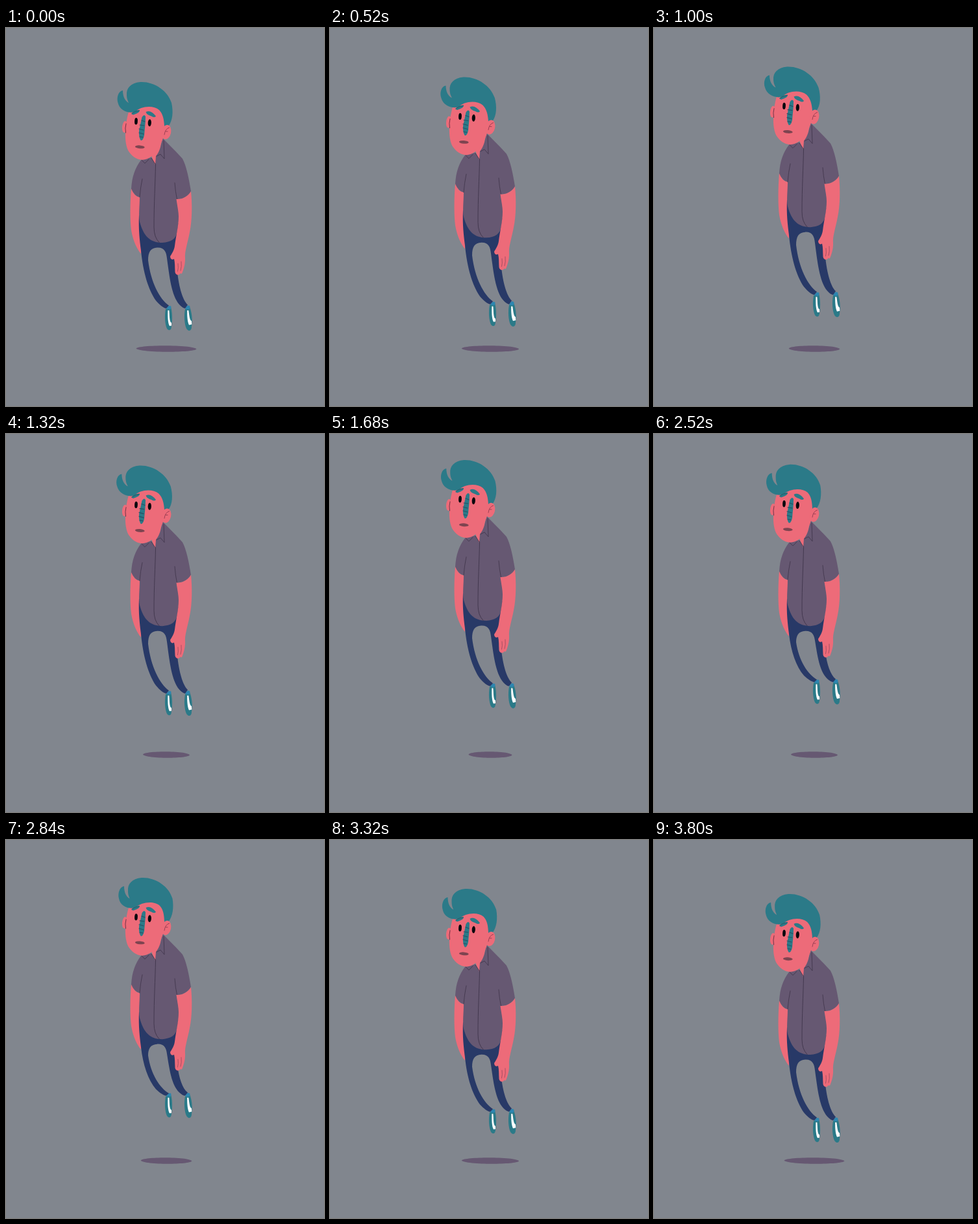
Write an HTML page with a canvas that moves like this. It is 490 px wide and 581 px high and loops after 3.84 s.

```html
<!DOCTYPE html>
<html lang="en">
<head>
<meta charset="utf-8">
<title>Floating man</title>
<style>
html, body { margin: 0; width: 100%; height: 100%; overflow: hidden; background: #81868e; }
canvas { display: block; }
</style>
</head>
<body>
<canvas id="stage" width="490" height="581"></canvas>
<script>
const ctx = document.getElementById('stage').getContext('2d');
const LOOP = 3840, STEP = 40;
const BG = '#81868e', SKIN = '#ed6b79', SHIRT = '#665872', PANTS = '#283967',
      TEAL = '#2b7a88', SOCK = '#2c86b0', LINE = '#43384f', MOUTH = '#7e4450';

// Height gained at time t: eases up until `peak`, then back down.
function lift(t, peak, height) {
  const u = t < peak ? t / peak : (LOOP - t) / (LOOP - peak);
  return height * (1 - Math.cos(Math.PI * u)) / 2;
}

const ramp = (v, a, b) => Math.min(1, Math.max(0, (v - a) / (b - a)));

// Moves every "x y" pair of a path description.
function bend(d, move) {
  return new Path2D(d.replace(/([\d.]+) ([\d.]+)/g, (_, x, y) => move(+x, +y).join(' ')));
}

function fill(d, color, move) {
  ctx.fillStyle = color;
  ctx.fill(bend(d, move));
}

function line(d, color, width, move) {
  ctx.strokeStyle = color;
  ctx.lineWidth = width;
  ctx.stroke(bend(d, move));
}

function oval(x, y, rx, ry, tilt, color) {
  ctx.fillStyle = color;
  ctx.beginPath();
  ctx.ellipse(x, y, rx, ry, tilt, 0, Math.PI * 2);
  ctx.fill();
}

function drawShadow(rise) {
  const r = 46.5 - 13.5 * rise / 45, x = 247;
  ctx.fillStyle = SHIRT;
  ctx.beginPath();
  ctx.moveTo(x - r, 492.5);
  ctx.bezierCurveTo(x - r * .9, 486.8, x + r * .9, 486.8, x + r, 493.5);
  ctx.bezierCurveTo(x + r * .9, 499.3, x - r * .9, 499.3, x - r, 492.5);
  ctx.fill();
}

function drawLegs(move) {
  fill('M205 288 C204 310 206 326 208 342 C211 374 219 402 231 419 C237 426 243 430.5 247 431' +
    ' L251 426.5 C237 417 223 391 219 357 C219 344 223 338 233 337.5 C244 337 247 344 248 354' +
    ' C252 383 255 411 267 425 Q272 430.5 276 431 L280 425.5 C272 418 266.5 398 264 375 L266 300 Z', PANTS, move);
}

function drawShoes(move) {
  fill('M246 432 C244 443 245 455 248 462 C251 466 255 465 255 458 C257 448 256 436 254 429 Z', TEAL, move);
  fill('M276 432 C274 443 275 455 278 462 C281 467 286 466 286 459 C288 448 286 436 283 429 Z', TEAL, move);
  fill('M247 431 Q251 425 254.5 428 L254 432 Q250 434 247 431 Z', SOCK, move);
  fill('M276 431 Q280 424 283.5 428 L283 432 Q279 434 276 431 Z', SOCK, move);
  fill('M249.4 434 C249 443 249.3 453 252 458 L255 457.5 L255 453 C251.3 452 252.2 440 251.3 434 Z', '#fff', move);
  fill('M279.2 434 C279 443 279.7 452 282 456.5 L286.3 455.5 L286 450.5 C282.5 449 282.5 440 281.2 434 Z', '#fff', move);
}

function drawShirt(move) {
  fill('M224 196 L239 176 L236 203 L230 212 Z', SKIN, move);
  fill('M208 203 C199 215 194 228 193 247 C196 254 201 259.5 206 260 C206 274 204 288 206 298' +
    ' C212 320 222 330 241 330 C254 329 262 325 264 312 L267 290 L263 263 C272 264 281 258 285 251' +
    ' C282 232 278 212 272 201 C264 192 254 182 241 169 C239 182 236 191 231 197 L230 210 L224 199 Z', SHIRT, move);
  line('M230.5 209 C230 240 228 268 228 306 Q228 322 236 329.5', LINE, 1, move);
  line('M210 232 Q207 246 206 260 M260 238 Q261 252 263.5 263', LINE, .9, move);
  line('M209 203 L214 208 L220 202 M224 200 L230 209 M243 173 L244 201 L238 194 L232 197', LINE, .9, move);
}

function drawLeftArm(move) {
  fill('M193 246 C191 270 191 296 193 311 C196 328 202 340 208 347 L209 300 L206 260 Q197 259 193 246 Z', SKIN, move);
}

function drawRightArm(move) {
  fill('M262.5 263 C272 264 281 258 285 251 C287 270 287 296 283 314 C280 330 275 344 276 353' +
    ' C276.5 361 274 370 272 375 Q271 379 268.5 377 C267 381 261 380 260.5 375 C260 367 260.5 361 259 355' +
    ' C256 357 253 355 253 351 C256 346 259 342 260 335 C262 319 266 304 266 290 C266 282 264 274 262.5 263 Z', SKIN, move);
  line('M265 362 Q266 369 264.5 374 M270 359 Q271 367 269 373', '#9e4c61', .9, move);
}

function drawHead(move, sway) {
  const swept = (x, y) => move(x - sway * ramp(y, 145, 105), y);
  const [, shift] = move(0, 0);

  oval(183, 152 + shift, 4, 9, .1, SKIN);
  fill('M190 126 C184 143 180 177 190 191 C197 200.5 205 203 212 202.5 C225 201 233 189 238 180' +
    ' C242 170 247 158 247 142 C248 118 222 108 200 122 Z', SKIN, move);
  fill('M180 96 C173 97 170 107 172.5 115 C175 126 187 132 199 129 C207 120 227 118 236 126' +
    ' C242 132 243.5 141 244 151 L250 151 C257 143 258 128 255 115 C249 96 228 82 207 83' +
    ' C192 84 185 93 186 103 C186 109 188 112 189 115 C183 112 180 105 180 96 Z', TEAL, swept);
  oval(247, 160 + shift, 7.2, 11.2, .2, SKIN);
  line('M244 164 Q245 155 251.5 153 M246 159 L249 159', '#9b4054', 1, move);
  line('M185 147 Q183 154 184.5 161', '#6f3448', 1, move);

  fill('M193 132 Q198 126 206 126 Q207 130 196 133.5 Z', TEAL, move);
  fill('M215.5 129 Q223 125 231 135.5 Q229 138.5 224 135.5 Q220 134.5 217 132 Z', TEAL, move);
  line('M194 131 Q199 127.5 205 127', '#235363', .8, move);

  fill('M209.5 137 Q213 131.5 215 136 C215 147 213.5 157 213 165 Q211 174 207.5 172.5' +
    ' Q204.5 168 205 158 Z', TEAL, move);
  line('M209 142 L214 144 M206 149 L213 150 M205 155 L212 157 M205 161 L212 163 M206 167 L211 168', '#275064', 1.1, move);

  oval(200.5, 143.3 + shift, 2.4, 5.2, .05, '#08080d');
  oval(221.3, 145.7 + shift, 2.6, 5.5, .05, '#08080d');
  oval(206.3, 182.8 + shift, 7.4, 2.4, .08, MOUTH);
}

function draw(t) {
  const upper = lift(t, 1960, 45.3), hip = lift(t, 1920, 44.8), feet = lift(t, 2300, 52.2);
  const sway = 2 * Math.sin(2 * Math.PI * t / LOOP);
  const withUpper = (x, y) => [x, y - upper];
  const withFeet = (x, y) => [x, y - feet];
  const torso = (x, y) => [x, y - upper - (hip - upper) * ramp(y, 260, 330)];
  const legs = (x, y) => [x, y - hip - (feet - hip) * ramp(y, 345, 430)];

  ctx.fillStyle = BG;
  ctx.fillRect(0, 0, 490, 581);
  drawShadow(hip);
  drawLeftArm(withUpper);
  drawShoes(withFeet);
  drawLegs(legs);
  drawShirt(torso);
  drawRightArm(withUpper);
  drawHead(withUpper, sway);
}

ctx.lineCap = ctx.lineJoin = 'round';
const start = performance.now();
function tick() {
  const t = (performance.now() - start) % LOOP;
  draw(Math.floor(t / STEP) * STEP);
  requestAnimationFrame(tick);
}
tick();
</script>
</body>
</html>
```
